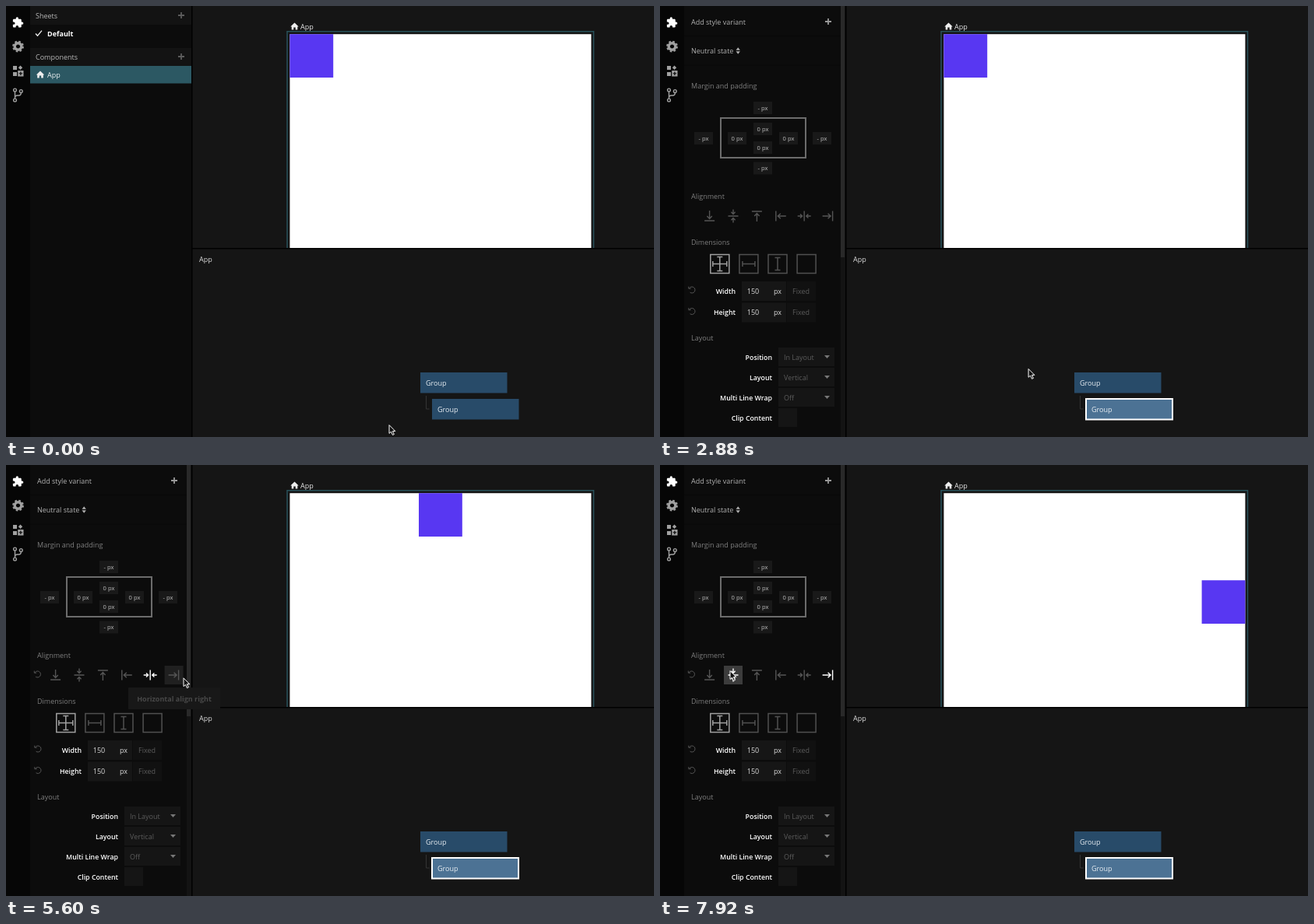
An HTML page for the animation above (8 s loop, 832 px wide and 554 px high).

```html
<!DOCTYPE html>
<html lang="en">
<head>
<meta charset="utf-8">
<title>Alignment panel</title>
<style>
  html, body { margin: 0; width: 100%; height: 100%; overflow: hidden; background: #151515; }
  svg { display: block; width: 100vw; height: 100vh; }
  text { font: 9px "Open Sans", sans-serif; }
  .bold { font-weight: 700; }
  .label { font-size: 8.8px; font-weight: 600; text-anchor: end; }
  .tiny { font-size: 7.6px; text-anchor: middle; }
  .mid { text-anchor: middle; }
  .line { fill: none; }
</style>
</head>
<body>
<svg id="stage" viewBox="0 0 832 554"></svg>
<script>
const stage = document.getElementById('stage');
const $ = id => document.getElementById(id);

// Markup helpers; text is placed by its vertical middle.
const text = (x, y, s, fill, cls = '') =>
  `<text x="${x}" y="${y + 3.6}" fill="${fill}" class="${cls}">${s}</text>`;
const rect = (x, y, w, h, fill, more = '') =>
  `<rect x="${x}" y="${y}" width="${w}" height="${h}" fill="${fill}" ${more}/>`;
const path = (d, fill, more = '') => `<path d="${d}" fill="${fill}" ${more}/>`;
const line = (d, stroke, w = 1, more = '') =>
  `<path d="${d}" class="line" stroke="${stroke}" stroke-width="${w}" ${more}/>`;
const at = (x, y, s, more = '') => `<g transform="translate(${x} ${y})" ${more}>${s}</g>`;
const plus = (x, y, c) => line(`M${x - 4} ${y}h8M${x} ${y - 4}v8`, c, 1.8);
const home = (x, y) =>
  at(x, y, path('M-5.2 .5 0-4.6 5.2 .5H3.8V4.5H1.2V1.5H-1.2V4.5H-3.8V.5z', '#eee'));
const undo = (x, y, more) =>
  at(x, y, line('M-3.4-2.2A4 4 0 1 1-2.4 3.2M-4.2-4.4v2.6h2.8', '#565656', 1), more);

const rail = () => rect(0, 0, 31, 554, '#060606') +
  at(7.6, 13.5, path('M20.5 11H19V7c0-1.1-.9-2-2-2h-4V3.5a2.5 2.5 0 0 0-5 0V5H4c-1.1 0-2 .9-2 2v3.8h1.5a2.7 2.7 0 0 1 0 5.4H2V20c0 1.1.9 2 2 2h3.8v-1.5a2.7 2.7 0 0 1 5.4 0V22H17c1.1 0 2-.9 2-2v-4h1.5a2.5 2.5 0 0 0 0-5z',
    '#fff', 'transform="scale(.64)"')) +
  at(15.5, 52, `<g class="line" stroke="#a0a0a0"><circle r="4.3" stroke-width="3.4"/>
    <circle r="6.4" stroke-width="2" stroke-dasharray="2.6 2.426"/></g>`) +
  path('M9 77h5v5H9zM18.5 76.5l2.7 2.7-2.7 2.7-2.7-2.7zM9 85h5v5H9zM15.2 83h7.3v7.5h-7.3z', '#a0a0a0') +
  line('M18.85 84.5v4.5M16.6 86.75h4.5', '#060606', 1.2) +
  `<g class="line" stroke="#a0a0a0" stroke-width="1.4"><circle cx="11.5" cy="108" r="1.9"/>
    <circle cx="19.3" cy="109.5" r="1.9"/><circle cx="11.5" cy="121" r="1.9"/>
    <path d="M11.5 110v9M19.3 111.5v.5q0 3-3 3h-1.8q-3 0-3 3"/></g>`;

const sheets = () =>
  rect(31, 0, 207, 24, '#131313') + text(38, 12, 'Sheets', '#b8b8b8') + plus(225, 12, '#5c5c5c') +
  line('M38 35.5l2.5 2.7 5.5-6.5', '#eee', 1.3) + text(53, 35, 'Default', '#fff', 'bold') +
  rect(31, 54, 207, 23, '#131313') + text(38, 65, 'Components', '#b8b8b8') + plus(225, 65, '#5c5c5c') +
  rect(31, 77, 207, 22.5, '#2c5863') + home(44, 88) + text(53, 88, 'App', '#eef3f4');

// Alignment buttons, left to right: [kind, rotation].
const buttons = [['end', 90], ['mid', 90], ['end', -90], ['end', 180], ['mid', 0], ['end', 0]];
const buttonX = i => 63.6 + i * 30.4;
const buttonArt = {
  end: 'M-7 0h10M0-3.2 3.5 0 0 3.2M6-6.5v13',
  mid: 'M-8.5 0h5M-5.2-2.6-2.6 0-5.2 2.6M8.5 0h-5M5.2-2.6 2.6 0 5.2 2.6M0-6.5v13'
};

const sizeArt = [
  'M-9 0H9M0-9V9M-9-3.5v7M9-3.5v7M-3.5-9h7M-3.5 9h7',
  'M-8 0H8M-8-3.5v7M8-3.5v7',
  'M0-8V8M-3.5-8h7M-3.5 8h7',
  ''
];

const pxBox = ([x, y, s]) => rect(x - 12, y - 8, 24, 16, '#191919') + text(x, y - .7, s, '#c0c0c0', 'tiny');

const sizeRow = (y, name) => undo(41, y - 1) + text(97, y, name, '#fff', 'label') +
  rect(105, y - 12, 57, 25, '#161616') + rect(163, y - 12, 37, 25, '#111') +
  text(119.5, y, '150', '#dcdcdc', 'mid') + text(151, y, 'px', '#dcdcdc', 'mid') + text(170, y, 'Fixed', '#5c5c5c');

const menuRow = ([y, name, value]) => text(144, y, name, '#fff', 'label') +
  rect(152, y - 12, value ? 72 : 24, 24, '#151515') +
  (value ? text(159, y, value, '#5c5c5c') + path(`M211 ${y - 2}h7l-3.5 4z`, '#777') : '');

const properties = () =>
  rect(232, 0, 6, 554, '#131313') + rect(232, 0, 5, 323, '#292929') +
  text(40, 20, 'Add style variant', '#b0b0b0') + plus(216, 20, '#999') +
  text(40, 57, 'Neutral state', '#b0b0b0') +
  path('M97.5 56.7l2.7-3.4 2.7 3.4zM97.5 58.3l2.7 3.4 2.7-3.4z', '#b0b0b0') +
  line('M31 38.5h201M31 76h201', '#080808') +
  text(40, 102, 'Margin and padding', '#7e7e7e') +
  rect(78, 144, 109, 51, 'none', 'stroke="#6c6c6c" stroke-width="2"') +
  [[132, 131, '- px'], [56, 170, '- px'], [208, 170, '- px'], [132, 208.5, '- px'],
   [132, 158, '0 px'], [99, 170, '0 px'], [165, 170, '0 px'], [132, 182, '0 px']].map(pxBox).join('') +
  text(40, 244, 'Alignment', '#7e7e7e') + undo(40.5, 269, 'id="reset"') +
  buttons.map(([kind, turn], i) => at(buttonX(i), 270,
    rect(-12, -12, 24, 24, 'none', `id="back${i}"`) +
    line(buttonArt[kind], '#555', 1.4, `id="icon${i}" transform="rotate(${turn})"`))).join('') +
  text(40, 303, 'Dimensions', '#7e7e7e') +
  sizeArt.map((d, i) => at(76.8 + i * 37.1, 331.5,
    rect(-12, -12, 24, 24, 'none', `stroke="${i ? '#505050' : '#a0a0a0'}" stroke-width="1.5"`) +
    line(d, i ? '#505050' : '#a0a0a0', 1.5))).join('') +
  sizeRow(366, 'Width') + sizeRow(393.5, 'Height') +
  text(40, 426, 'Layout', '#7e7e7e') +
  [[451, 'Position', 'In Layout'], [477, 'Layout', 'Vertical'],
   [503, 'Multi Line Wrap', 'Off'], [529, 'Clip Content', '']].map(menuRow).join('');

stage.innerHTML =
  rect(0, 0, 832, 554, '#151515') +
  home(370.5, 26) + text(378, 26, 'App', '#e6e6e6') +
  line('M361 311V32.7H754.5V311', '#28525b', 1.5) +
  rect(364.4, 36.2, 387, 275, '#fff') + rect(0, 0, 55.8, 55.8, '#5837f2', 'id="square"') +
  rect(239, 311, 593, 243, '#151515') + rect(239, 311, 593, 1.4, '#000') +
  text(248, 325, 'App', '#dcdcdc') +
  line('M539.5 501v17h4', '#343434') +
  rect(532, 471, 111.5, 26.5, '#284b69') + text(539, 484, 'Group', '#e6ecf1') +
  rect(547, 505, 111.5, 26.5, '#284b69', 'id="node"') + text(554, 518, 'Group', '#e6ecf1') +
  '<circle id="dot" cx="650" cy="512" r="3.6" fill="#a9bccd"/>' +
  rect(547, 505, 111, 26.5, 'none', 'id="outline" stroke="#fff" stroke-width="2"') +
  rect(31, 0, 207, 554, '#0c0c0c') +
  `<g id="sheets">${sheets()}</g><g id="properties">${properties()}</g>` +
  rail() + rect(238, 0, 1.5, 554, '#000') +
  `<g id="tip">${rect(157, 286, 118, 28, '#181818', 'rx="1"')}${text(216, 300.5, 'Horizontal align right', '#484848', 'bold mid')}</g>` +
  path('M0 0v10.8l2.5-2.2 1.9 4.2 1.9-.8-1.9-4.1h3.4z', '#111', 'id="cursor" stroke="#fff"');

const LOOP = 8000, SELECT = 1920, CENTER = 4720, RIGHT = 5920, MIDDLE = 7280;

// Pointer stops: time, x, y.
const stops = [
  [720, 492, 538.6], [1100, 576.7, 525.6], [2560, 576.7, 525.6], [3480, 207, 314.6],
  [4080, 207, 314.6], [4500, 187, 273], [5040, 187, 273], [5360, 228, 273.8],
  [6320, 228, 273.8], [7000, 90, 264.6]
];

function pointer(t) {
  const i = stops.findIndex(s => s[0] > t);
  if (i === 0) return stops[0].slice(1);
  if (i < 0) return stops[stops.length - 1].slice(1);
  const [t0, x0, y0] = stops[i - 1], [t1, x1, y1] = stops[i];
  const p = (t - t0) / (t1 - t0), e = p * p * (3 - 2 * p);
  return [x0 + (x1 - x0) * e, y0 + (y1 - y0) * e];
}

const show = (id, on) => $(id).setAttribute('visibility', on ? 'visible' : 'hidden');
const set = (id, name, value) => $(id).setAttribute(name, value);

function draw(t) {
  const [x, y] = pointer(t);
  const selected = t >= SELECT;
  const hover = x > 547 && x < 658 && y > 505 && y < 531;

  set('cursor', 'transform', `translate(${x} ${y})`);
  show('sheets', !selected);
  show('properties', selected);
  show('reset', t >= CENTER);
  show('outline', selected);
  show('dot', hover);
  set('node', 'fill', hover || selected ? '#4c7294' : '#284b69');

  set('square', 'fill', hover ? '#748ce8' : '#5837f2');
  set('square', 'x', t < CENTER ? 364.4 : t < RIGHT ? 530 : 695.6);
  set('square', 'y', t < MIDDLE ? 36.2 : 148.2);

  const across = t < CENTER ? -1 : t < RIGHT ? 4 : 5;
  const down = t < MIDDLE ? -1 : 1;
  buttons.forEach((_, i) => {
    const active = i === across || i === down;
    const over = selected && Math.abs(x - buttonX(i)) < 12.9 && Math.abs(y - 270) < 12;
    set('icon' + i, 'stroke', active ? '#fff' : '#555');
    set('back' + i, 'fill', !over ? 'none' : active ? '#3c3c3c' : '#202020');
  });
  show('tip', t >= 5440 && t < 6400);
}

function frame(now) {
  draw(now % LOOP);
  requestAnimationFrame(frame);
}
draw(0);
requestAnimationFrame(frame);
</script>
</body>
</html>
```
